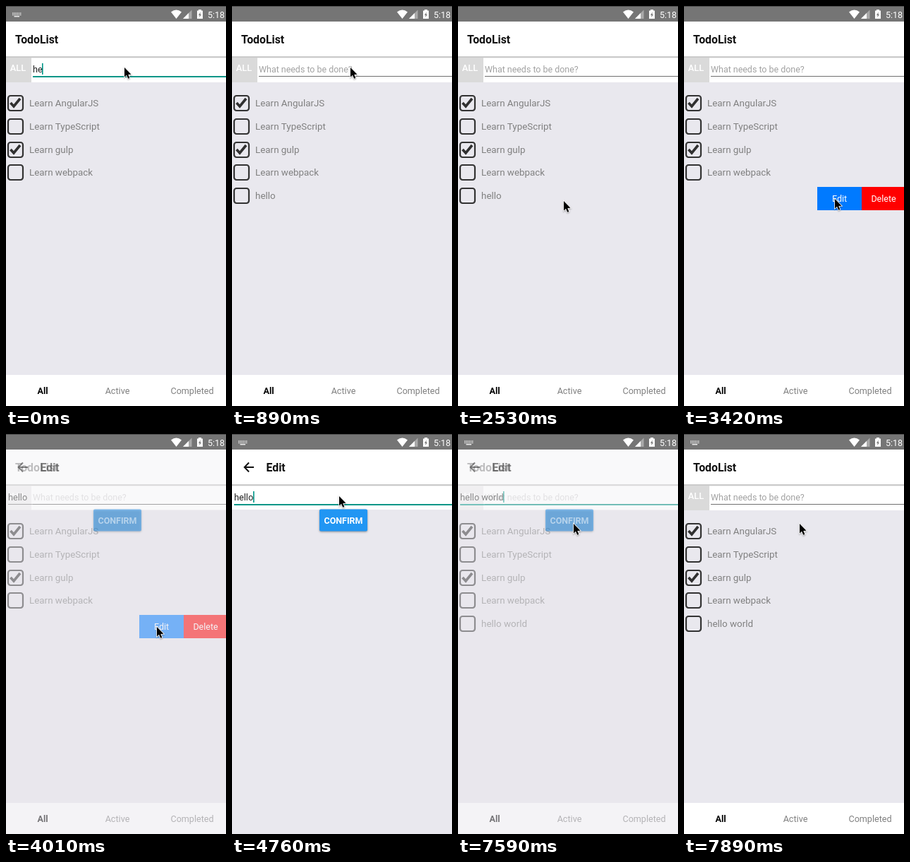
Recreate the animation shown at these times as an HTML page with a canvas. Size 312 by 566 pixels, loop 8 s.

```html
<!DOCTYPE html>
<html>
<head>
<meta charset="utf-8">
<style>
html, body { margin: 0; width: 100%; height: 100%; overflow: hidden; background: #e9e8ee; }
canvas { display: block; }
</style>
</head>
<body>
<canvas id="stage" width="312" height="566"></canvas>
<script>
const g = document.getElementById('stage').getContext('2d');
const LOOP = 8000, TICK = 148.8;
const BG = '#e9e8ee', TEAL = '#009688', GRAY = '#808080';
const ITEMS = ['Learn AngularJS', 'Learn TypeScript', 'Learn gulp', 'Learn webpack'];

// Pointer stops: tick, x, y
const stops = [
  [8, 168, 86], [11, 234, 393], [12, 239, 426], [15, 131, 300], [16, 150, 275], [17, 150, 275],
  [19, 45, 280], [23, 214, 272], [27, 214, 272], [31, 152, 87], [46, 152, 87], [49, 164, 126]
];

const ramp = (n, from, to) => Math.min(1, Math.max(0, (n - from) / (to - from)));

function pointerAt(n) {
  const i = Math.max(1, stops.findIndex(s => s[0] > n));
  const [a, b] = n >= stops.at(-1)[0] ? stops.slice(-2) : [stops[i - 1], stops[i]];
  const k = ramp(n, a[0], b[0]);
  return [a[1] + (b[1] - a[1]) * k, a[2] + (b[2] - a[2]) * k];
}

function rect(x, y, w, h, color) {
  g.fillStyle = color;
  g.fillRect(x, y, w, h);
}
function text(s, x, y, size, color, weight = 400, align = 'left') {
  g.font = `${weight} ${size}px Roboto, sans-serif`;
  g.textAlign = align;
  g.fillStyle = color;
  g.fillText(s, x, y);
}
function fill(d, color) {
  g.fillStyle = color;
  g.fill(new Path2D(d));
}
function stroke(d, width, color) {
  g.lineWidth = width;
  g.strokeStyle = color;
  g.stroke(new Path2D(d));
}
function at(x, y, paint) {
  g.save();
  g.translate(x, y);
  paint();
  g.restore();
}
function shadow(color, blur) {
  g.shadowColor = color;
  g.shadowBlur = blur;
  g.shadowOffsetY = 1;
}

function statusBar(keyboard) {
  rect(0, 0, 312, 22, '#757575');
  rect(0, 0, 312, 1, '#4a4a4a');
  if (keyboard) {
    for (let i = 0; i < 12; i++) rect(9 + i % 6 * 2.2, i < 6 ? 9.5 : 11.8, 1.4, 1.4, '#eee');
    rect(11.5, 14, 7.5, 1.5, '#eee');
  }
  fill('M241.5 18L234 8.5Q241.5 2.5 249 8.5Z', '#fff');
  fill('M251 18H263.5V5.5Z', '#a9a9a9');
  fill('M251 18H259V10Z', '#fff');
  fill('M271 6.5H273V5H277V6.5H279V18H271Z', '#fff');
  fill('M275.8 8.5L273 13H274.7L274.2 16.2L277 11.7H275.3Z', '#757575');
  text('5:18', 310, 16.5, 12.5, '#fff', 400, 'right');
}

function header(title, x) {
  rect(0, 22, 312, 86, '#fff');
  ['#d2d2d2', '#c6c6c6', '#ededed'].forEach((c, i) => rect(0, 71 + i, 312, 1, c));
  text(title, x, 53, 15.8, '#111', 700);
}

function input(value, x, focused) {
  if (value) text(value, x, 94, 12.7, '#222');
  else text('What needs to be done?', x, 94, 12.45, '#a2a2a2');
  rect(x, 99, 312 - x, focused ? 2 : 1, focused ? TEAL : '#707070');
  if (focused) rect(Math.floor(x + g.measureText(value).width), 81, 1.6, 16, TEAL);
}

function todo(label, i, done) {
  at(0, Math.round(137.3 + i * 32.7), () => {
    g.beginPath();
    g.roundRect(3, -10, 21, 21, 3.5);
    g.lineWidth = 2.2;
    g.strokeStyle = '#333';
    g.stroke();
    if (done) stroke('M6.5 0L11 5L20 -6', 3.6, '#303030');
    text(label, 33, 5, 13.4, GRAY);
  });
}

function listPage(n) {
  const typing = n < 6, renamed = n > 34;
  rect(0, 22, 312, 544, BG);
  header('TodoList', 13);
  rect(0, 73, 36, 35, '#dadada');
  text('ALL', 17, 92.3, 12.8, '#fff', 500, 'center');
  input(typing ? 'hello'.slice(0, Math.round(2 + n * 0.72)) : '', 38, typing);
  ITEMS.forEach((label, i) => todo(label, i, i % 2 === 0));
  if (!typing) {
    const shift = renamed ? 0 : 126 * ramp(n, 17, 19.4);
    if (shift) {
      rect(189, 256, 63, 33, '#007aff');
      rect(252, 256, 63, 33, '#f00');
      text('Edit', 220.5, 277, 12.5, '#fff', 400, 'center');
      text('Delete', 283, 277, 12.5, '#fff', 400, 'center');
      rect(-shift, 256, 315, 33, BG);
    }
    at(-shift, 0, () => todo(renamed ? 'hello world' : 'hello', 4));
  }
  rect(0, 522, 312, 44, '#fff');
  ['All', 'Active', 'Completed'].forEach((tab, i) =>
    text(tab, 52 + i * 106, 549.3, 12.6, i ? GRAY : '#000', i ? 400 : 700, 'center'));
}

function editPage(n) {
  rect(0, 22, 312, 544, BG);
  header('Edit', 48.5);
  rect(0, 107, 312, 1, BG);
  stroke('M31 47H18M24 40.5L17.7 47L24 53.5', 2, '#111');
  const added = Math.max(0, Math.round((n - 34) * 0.455 + 0.5));
  input('hello world'.slice(0, 5 + added), 3, n >= 31);
  at(124, 106.5, () => {
    shadow('rgba(0,0,0,.4)', 3);
    g.beginPath();
    g.roundRect(0, 0, 68, 31, 2);
    g.fillStyle = '#2196f3';
    g.fill();
  });
  text('CONFIRM', 158, 127, 12.5, '#fff', 700, 'center');
}

function pointer(x, y) {
  at(x, y + 1, () => {
    const arrow = 'M0 0V13.5L3 10.7L5.2 15.8L7.4 14.9L5.3 9.9L9.5 9.7Z';
    shadow('rgba(0,0,0,.35)', 2);
    stroke(arrow, 1.6, '#fff');
    g.shadowColor = 'transparent';
    fill(arrow, '#000');
  });
}

function draw(now) {
  const n = Math.floor((now % LOOP + 4) / TICK);
  const editing = ramp(n, 25, 27) - ramp(n, 50, 52);
  if (editing < 1) listPage(n);
  g.globalAlpha = editing;
  if (editing) editPage(n);
  g.globalAlpha = 1;
  statusBar(n < 6 || n >= 32);
  pointer(...pointerAt(n));
  requestAnimationFrame(draw);
}
requestAnimationFrame(draw);
</script>
</body>
</html>
```
